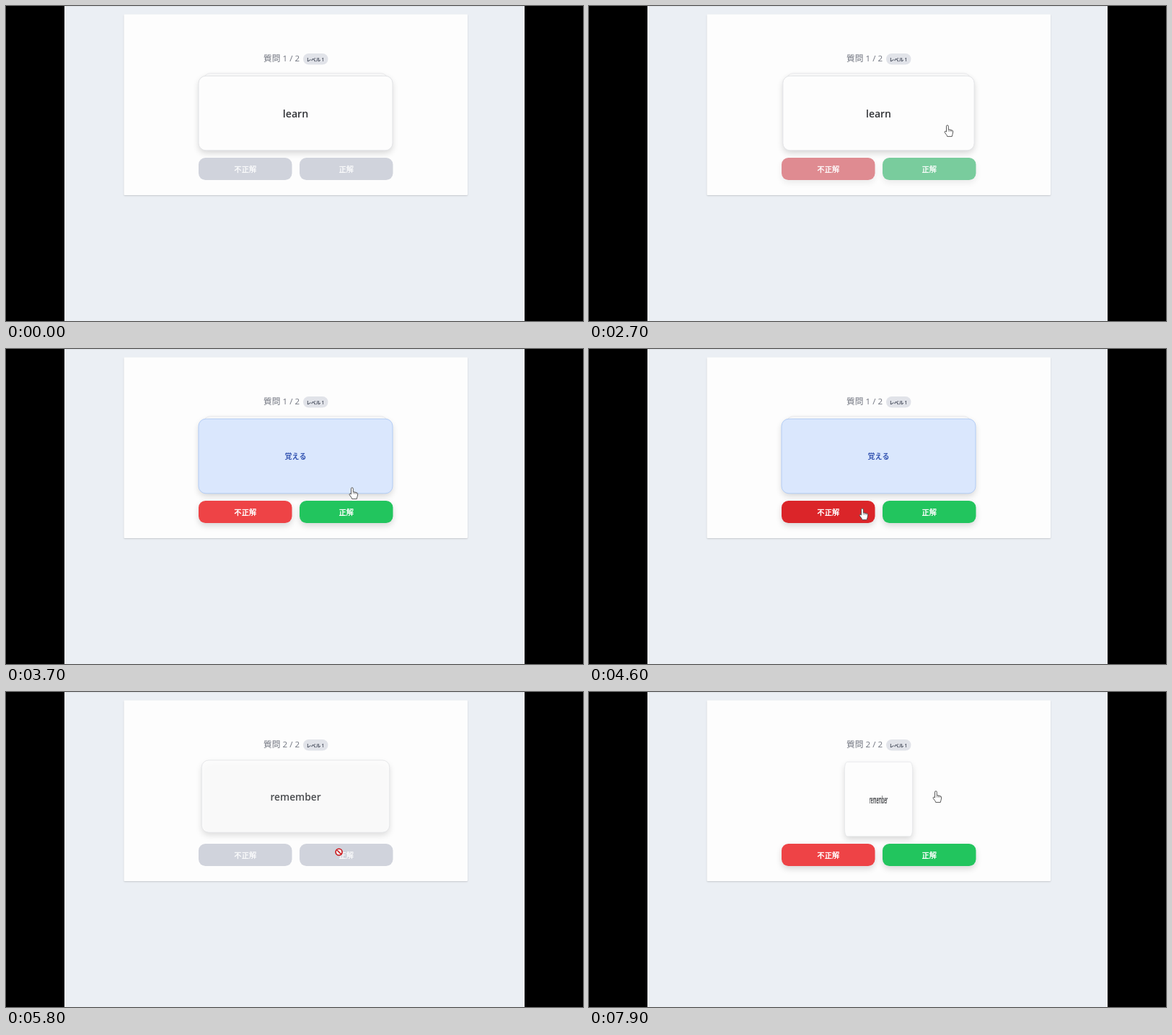
Recreate the animation shown at these times as an HTML page with a canvas. Size 800 px wide and 438 px high, loop 8 s.

```html
<!DOCTYPE html>
<html lang="ja">
<head>
<meta charset="utf-8">
<style>
html, body { margin: 0; width: 100%; height: 100%; overflow: hidden; background: #000; }
canvas { display: block; }
</style>
</head>
<body>
<canvas id="stage" width="800" height="438"></canvas>
<script>
const ctx = document.getElementById('stage').getContext('2d');
const LOOP = 8000, STEP = 100;
const FLIP = 2659, ANSWER = 5408, NEXT = 5708, FLIP_NEXT = 7756;
const LATIN = '"Open Sans", "Noto Sans", sans-serif';
const KANJI = '"Noto Sans CJK JP", "Noto Sans CJK", sans-serif';
const WHITE = '#fdfdfd';

// Pointer hotspot: time, x, y
const POINTER = [
  [2700, 497, 166], [2900, 497, 166], [3500, 490, 164], [3900, 470, 222],
  [4050, 465, 222], [4400, 379, 222], [4600, 379, 222], [5300, 461, 222],
  [6200, 461, 222], [6700, 481, 130], [6900, 481, 130], [7300, 481, 138], [8000, 481, 138]
];
const BUTTONS = [
  { x: 267, label: '不正解', base: [238, 67, 70], hover: [219, 37, 41] },
  { x: 407, label: '正解', base: [34, 197, 94], hover: [23, 162, 72] }
];
const GREY = [208, 211, 220];
const HAND = new Path2D('M-1.5 9V1.2a1.4 1.4 0 0 1 2.8 0V5.6L5.8 6.6Q7.9 7 7.7 9L7 12.6Q6.4 14 6.3 15.4H-.3L-1 13.6L-3.8 9.8Q-4.2 8 -2.8 8.1Z');
const KNUCKLES = new Path2D('M1.3 5.6V8.6M3.5 6.1V8.8M5.6 6.6V9');

const mix = (a, b, k) => a + (b - a) * k;

// The CSS "ease" curve
function ease(x) {
  if (x <= 0) return 0;
  if (x >= 1) return 1;
  let lo = 0, hi = 1, s;
  for (let i = 0; i < 20; i++) {
    s = (lo + hi) / 2;
    if (.75 * s * (1 - s) + s ** 3 < x) lo = s; else hi = s;
  }
  return .3 * s * (1 - s) ** 2 + 3 * (1 - s) * s * s + s ** 3;
}

function box(x, y, w, h, r, fill, stroke) {
  ctx.beginPath();
  ctx.roundRect(x, y, w, h, r);
  ctx.fillStyle = fill;
  ctx.fill();
  ctx.shadowColor = 'transparent';
  if (stroke) {
    ctx.strokeStyle = stroke;
    ctx.lineWidth = 1;
    ctx.stroke();
  }
}

function shadow(alpha, y, blur) {
  ctx.shadowColor = `rgba(0,0,0,${alpha})`;
  ctx.shadowOffsetY = y;
  ctx.shadowBlur = blur;
}

function text(str, x, y, font, color, align = 'center') {
  ctx.font = font;
  ctx.fillStyle = color;
  ctx.textAlign = align;
  ctx.fillText(str, x, y);
}

function pointerAt(t) {
  const i = POINTER.findIndex(p => p[0] > t);
  if (i < 1) return null;
  const [a, b] = [POINTER[i - 1], POINTER[i]];
  const k = (t - a[0]) / (b[0] - a[0]);
  return { x: mix(a[1], b[1], k), y: mix(a[2], b[2], k) };
}

const enabled = t => (t >= FLIP && t < ANSWER) || t >= FLIP_NEXT;
const over = (b, p) => p && p.x >= b.x && p.x < b.x + 129.5 && p.y >= 211 && p.y < 242;

function drawPage(t) {
  ctx.fillStyle = '#000';
  ctx.fillRect(0, 0, 800, 438);
  ctx.fillStyle = '#ebeff4';
  ctx.fillRect(81, 0, 638, 438);
  ctx.fillStyle = '#dfe3e8';
  ctx.fillRect(81, 0, 638, 1);
  shadow(.16, 1, 2);
  box(163.5, 11.5, 476.5, 251.5, 1, WHITE);

  const color = '#70747f';
  text('質問', 357, 77, `350 11.7px ${KANJI}`, color, 'left');
  text(`${t < NEXT ? 1 : 2} / 2`, 383.5, 77, `11.6px ${LATIN}`, color, 'left');
  box(412, 66, 34.5, 15.5, 8, '#e1e3e9');
  ctx.fontKerning = 'normal';
  text('レベル', 416.5, 76.8, `700 6.6px ${KANJI}`, '#454b5a', 'left');
  text('1', 437.5, 76.8, `600 6.6px ${LATIN}`, '#454b5a', 'left');
}

// depth 0 is the front of the stack, 1 the card behind it
function drawCard(word, answer, turn, depth) {
  const cos = Math.cos(turn * Math.PI), size = 1 - .05 * depth;
  if (Math.abs(cos) < .004) return;
  ctx.save();
  ctx.translate(401.5, 149 - 6.2 * depth);
  ctx.scale(Math.abs(cos) * size, size);
  ctx.globalAlpha = 1 - .2 * depth;
  shadow(.15, 4, 8);
  const front = cos > 0;
  box(-134.5, -51.8, 269, 103.6, 10, front ? WHITE : '#dae7fd', front ? '#e3e4e7' : '#b3cdf6');
  if (front) text(word, 0, 6, `600 14.2px ${LATIN}`, '#303236');
  else text(answer, 0, 4, `700 10px ${KANJI}`, '#3555b2');
  ctx.restore();
}

function drawButton(b, t) {
  // Averaging the recent states gives a short colour transition
  const past = [0, 40, 80, 120].map(d => t - d);
  const colors = past.map(s => !enabled(s) ? GREY : over(b, pointerAt(s)) ? b.hover : b.base);
  const rgb = GREY.map((_, i) => Math.round(colors.reduce((sum, c) => sum + c[i], 0) / 4));
  const on = past.filter(enabled).length / 4;
  shadow(.15 * on, 4, 8);
  box(b.x, 211, 129.5, 31, 9.5, `rgb(${rgb})`);
  text(b.label, b.x + 64.8, 230.8, `700 10.3px ${KANJI}`, `rgba(255,255,255,${mix(.85, 1, on)})`);
}

function drawPointer(t) {
  const p = pointerAt(t);
  if (!p) return;
  ctx.save();
  ctx.translate(p.x, p.y);
  if (!enabled(t) && BUTTONS.some(b => over(b, p))) {
    ctx.translate(.6, .5);
    ctx.beginPath();
    ctx.arc(0, 0, 4.5, 0, 7);
    ctx.fillStyle = 'rgba(255,255,255,.7)';
    ctx.fill();
    ctx.moveTo(-3.2, -3.2);
    ctx.lineTo(3.2, 3.2);
    ctx.strokeStyle = '#cc1519';
    ctx.lineWidth = 1.6;
    ctx.stroke();
  } else {
    ctx.fillStyle = '#fff';
    ctx.fill(HAND);
    ctx.strokeStyle = '#484848';
    ctx.lineWidth = .9;
    ctx.stroke(HAND);
    ctx.lineWidth = .6;
    ctx.stroke(KNUCKLES);
  }
  ctx.restore();
}

function draw(now) {
  const t = Math.floor(now % LOOP / STEP) * STEP;
  drawPage(t);
  drawCard('remember', '', ease((t - FLIP_NEXT) / 600), 1 - ease((t - NEXT) / 400));
  if (t < NEXT) drawCard('learn', '覚える', ease((t - FLIP) / 600) - ease((t - ANSWER) / 600), 0);
  BUTTONS.forEach(b => drawButton(b, t));
  drawPointer(t);
}

const start = performance.now();
function tick() {
  draw(performance.now() - start);
  requestAnimationFrame(tick);
}
tick();
</script>
</body>
</html>
```
